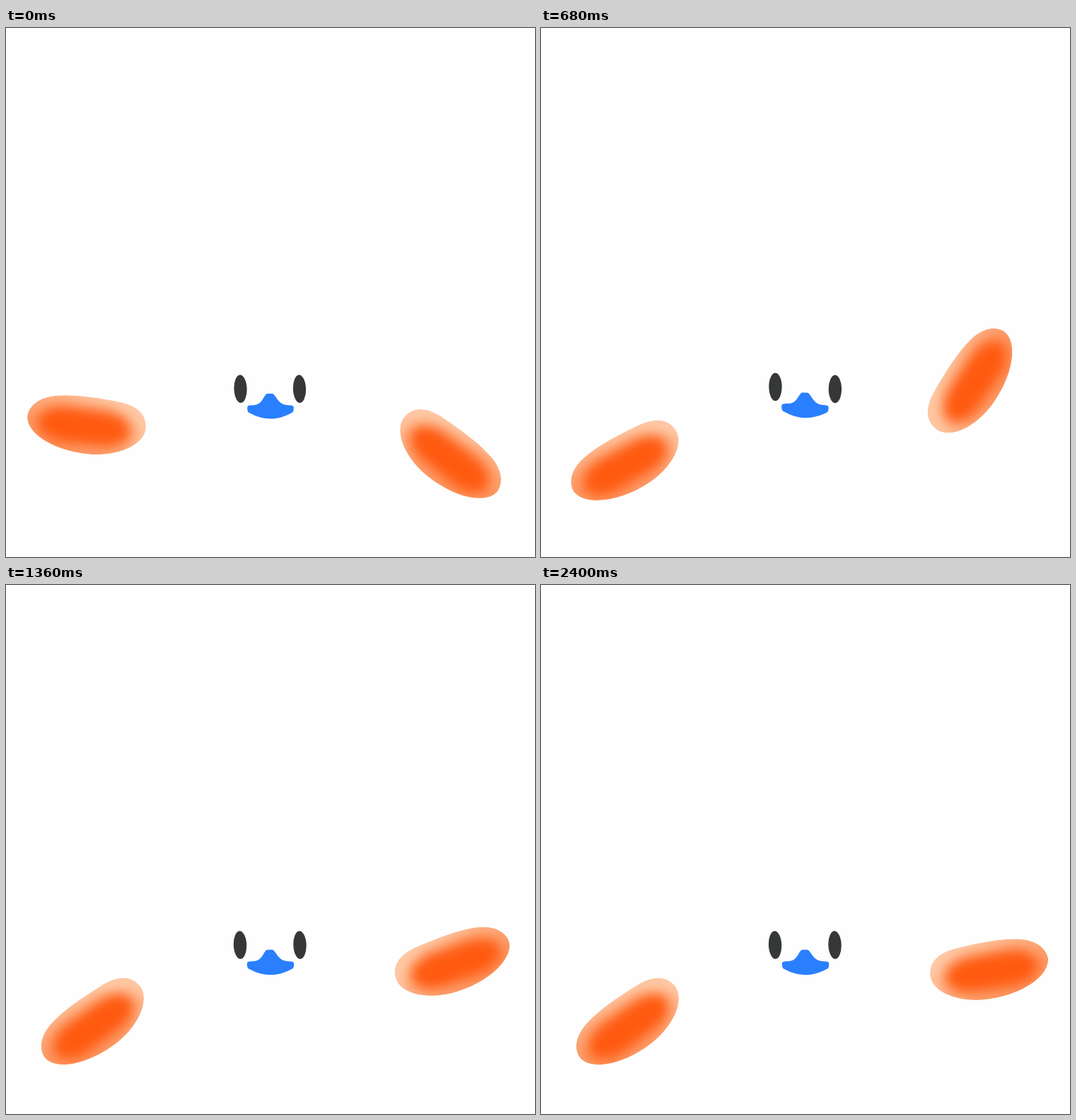
These frames come from a looping animation (748 px wide and 748 px high, 2.44 s). An HTML page:

```html
<!DOCTYPE html>
<html lang="en">
<head>
<meta charset="utf-8">
<title>Waving bird</title>
<style>
  html, body { margin: 0; width: 100%; height: 100%; overflow: hidden; background: #fefefe; }
  svg { display: block; width: 100%; height: 100%; }
</style>
</head>
<body>
<svg viewBox="0 0 748 748">
  <defs>
    <linearGradient id="skin" gradientUnits="userSpaceOnUse" x1="-28" y1="-40" x2="16" y2="40">
      <stop offset="0" stop-color="#fec8a4"/>
      <stop offset="1" stop-color="#fc9a66"/>
    </linearGradient>
    <filter id="soft" x="-40%" y="-80%" width="180%" height="260%" color-interpolation-filters="sRGB">
      <feGaussianBlur stdDeviation="9"/>
    </filter>
    <path id="outline" d="M-84.5-6C-83-27-66-36-42-38C-10-40 25-41 50-35C70-30 83-18 84-3C84 21 44 41-4 41C-48 41-86 19-84.5-6Z"/>
    <clipPath id="edge"><use href="#outline"/></clipPath>
    <g id="wing" clip-path="url(#edge)">
      <use href="#outline" fill="url(#skin)"/>
      <rect x="-65" y="-23" width="135" height="52" rx="42" ry="26" fill="#ff5a10" filter="url(#soft)"/>
    </g>
  </defs>
  <use id="left" href="#wing"/>
  <use id="right" href="#wing"/>
  <g id="face">
    <g fill="#363838">
      <ellipse cx="331" cy="509" rx="9.2" ry="19.8" transform="rotate(-2 331 509)"/>
      <ellipse cx="415.5" cy="509" rx="9.2" ry="19.8" transform="rotate(-2 415.5 509)"/>
    </g>
    <path fill="#2a7fff" d="M369 515.7H377C381 517 385 529 393 531C399 533 404 531 407 534Q408 538 406 542C396 548 384 551.3 374 551.3C362 551.3 351 547 342 542Q340 538 341 534C344 531 349 533 355 531C363 528 365 517 369 515.7Z"/>
  </g>
</svg>
<script>
const LOOP = 2440, STEP = 40;
const [left, right, face] = ["left", "right", "face"].map(id => document.getElementById(id));

// Each track is a list of [time, value], eased in and out between points.
const rightAngle = [[0, 37.5], [960, -79.5], [1360, -19.5], [1920, -46], [2480, -8]];
const rightX = [[0, 580], [400, 575], [680, 572]];
const rightY = [[0, 564], [400, 558.5], [680, 550]];
const leftAngle = [[0, -7], [460, 36], [800, 26.5], [1460, 36], [1840, 26.5], [2480, 36]];
const leftX = [[0, 572], [400, 575.7]];
const leftY = [[0, 564], [400, 580.5]];
const faceTilt = [[0, 0], [400, 2.7], [680, 2], [960, 0]];
const faceDrop = [[0, 1.3], [400, 2.8], [680, 0]];
const faceScale = [[0, 0.988], [400, 0.97], [680, 1]];

function at(track, t) {
  const i = track.findIndex(([time]) => time > t);
  if (i < 0) return track[track.length - 1][1];
  const [t0, v0] = track[i - 1], [t1, v1] = track[i];
  return v0 + (v1 - v0) * (1 - Math.cos(Math.PI * (t - t0) / (t1 - t0))) / 2;
}

function pose(wing, mirror, x, y, angle) {
  wing.setAttribute("transform", `${mirror}translate(${x} ${y}) rotate(${angle}) translate(62.7 4.7)`);
}

function draw(now) {
  const t = Math.floor(now % LOOP / STEP) * STEP;
  pose(right, "", at(rightX, t), at(rightY, t), at(rightAngle, t));
  pose(left, "translate(748 0) scale(-1 1) ", at(leftX, t), at(leftY, t), at(leftAngle, t));
  face.setAttribute("transform",
    `translate(373.5 ${520 + at(faceDrop, t)}) rotate(${at(faceTilt, t)}) scale(${at(faceScale, t)} 1) translate(-373.5 -520)`);
}

const start = performance.now();
function tick() {
  draw(performance.now() - start);
  requestAnimationFrame(tick);
}
tick();
</script>
</body>
</html>
```
